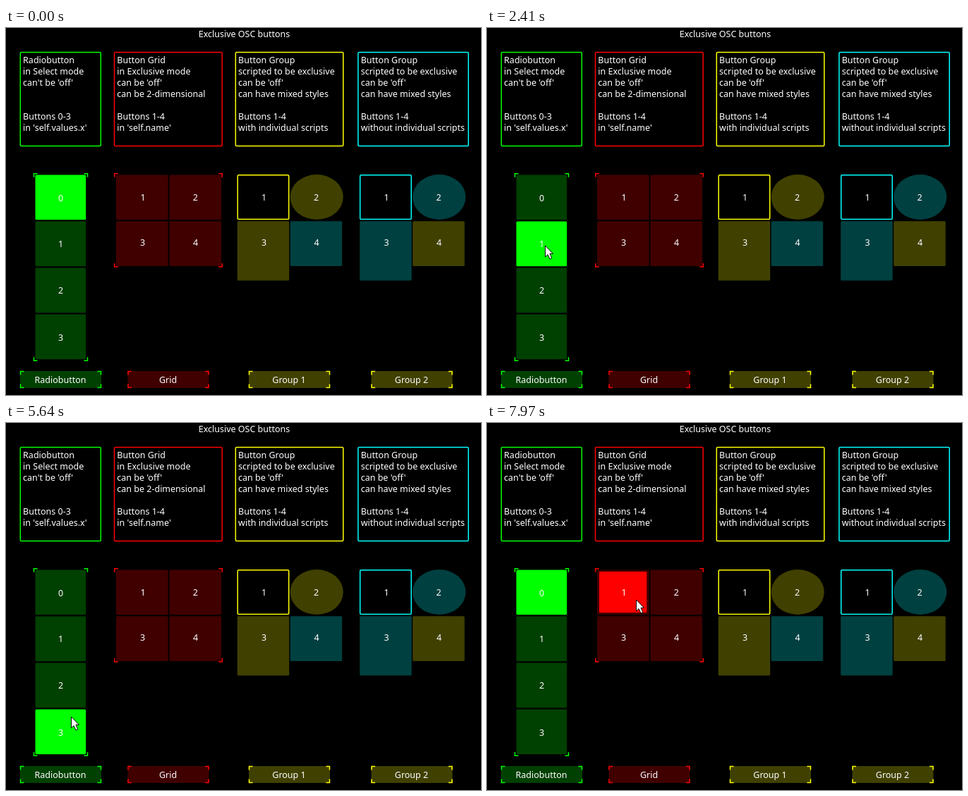
Recreate the animation shown at these times as an HTML page. Size 673 by 521 pixels, loop 8 s.

```html
<!DOCTYPE html>
<html lang="en">
<head>
<meta charset="utf-8">
<title>Exclusive OSC buttons</title>
<style>
html, body { margin: 0; width: 100%; height: 100%; overflow: hidden; background: #000; }
svg { display: block; }
text { font: 12.5px "Noto Sans", "Open Sans", sans-serif; fill: #fff; white-space: pre; }
.mid { text-anchor: middle; }
.line { fill: none; stroke-width: 1.5; }
</style>
</head>
<body>
<svg id="stage" width="673" height="521" viewBox="0 0 673 521"></svg>
<script>
const LOOP = 8000;
const stage = document.getElementById('stage');
const GREEN = '#00ff00', RED = '#ff0000', YELLOW = '#ffff00', CYAN = '#00ffff';
const DARK = { [GREEN]: '#004000', [RED]: '#400000', [YELLOW]: '#404000', [CYAN]: '#004040' };

function add(tag, attrs, content) {
  const node = document.createElementNS('http://www.w3.org/2000/svg', tag);
  for (const key in attrs) node.setAttribute(key, attrs[key]);
  if (content) node.textContent = content;
  return stage.appendChild(node);
}
const label = (x, y, content) => add('text', { x, y: y + 4.5, class: 'mid' }, content);
const block = (x, y, width, height, fill) => add('rect', { x, y, width, height, rx: 1.5, fill });
const outline = (x, y, width, height, stroke) =>
  add('rect', { x, y, width, height, rx: 1.5, stroke, class: 'line' });

function brackets(x, y, w, h, stroke) {
  const r = x + w, b = y + h;
  add('path', { class: 'line', stroke, d:
    `M${x} ${y + 5}V${y}H${x + 5}M${r - 5} ${y}H${r}V${y + 5}` +
    `M${r} ${b - 5}V${b}H${r - 5}M${x + 5} ${b}H${x}V${b - 5}` });
}

function infoBox(x, width, color, lines) {
  outline(x, 34.5, width, 133, color);
  lines.forEach((s, i) => s && add('text', { x: x + 3.8, y: 50 + i * 16 }, s));
}

function footer(x, color, name) {
  block(x, 487, 115, 24, DARK[color]);
  brackets(x + .5, 487.5, 114, 23, color);
  label(x + 57, 499.5, name);
}

function group(x, main, other) {
  outline(x + .5, 208.7, 72.5, 62.8, main);
  add('ellipse', { cx: x + 112.5, cy: 240, rx: 37.6, ry: 32, fill: DARK[main] });
  block(x, 274.3, 73.5, 84.2, DARK[main]);
  block(x + 75, 274.3, 73.5, 63.8, DARK[other]);
  label(x + 38, 240, '1');
  label(x + 112, 240, '2');
  label(x + 38, 304, '3');
  label(x + 112.3, 304, '4');
}

label(337.5, 8.5, 'Exclusive OSC buttons');

const scripted = ['Button Group', 'scripted to be exclusive', "can be 'off'",
  'can have mixed styles', '', 'Buttons 1-4'];
infoBox(20.3, 114, GREEN, ['Radiobutton', 'in Select mode', "can't be 'off'", '', '',
  'Buttons 0-3', "in 'self.values.x'"]);
infoBox(153.5, 152.7, RED, ['Button Grid', 'in Exclusive mode', "can be 'off'",
  'can be 2-dimensional', '', 'Buttons 1-4', "in 'self.name'"]);
infoBox(325.3, 152.5, YELLOW, [...scripted, 'with individual scripts']);
infoBox(498.9, 156.3, CYAN, [...scripted, 'without individual scripts']);

brackets(39.5, 206.7, 76, 265.5, GREEN);
const radio = [0, 1, 2, 3].map(i => {
  const cell = block(41.5, 208.4 + i * 66, 71.7, 63.8, DARK[GREEN]);
  label(77.7, [241, 306, 372, 439][i], String(i));
  return cell;
});

brackets(153.8, 206.7, 152.5, 132.3, RED);
for (const [x, y] of [[156, 208.4], [231.4, 208.4], [156, 274.3], [231.4, 274.3]])
  block(x, y, 73.6, 63.8, DARK[RED]);
const gridLit = block(159, 211, 67.3, 58.2, RED);
label(194, 240, '1');
label(268.3, 240, '2');
label(193.7, 304, '3');
label(268.5, 304, '4');

group(327.7, YELLOW, CYAN);
group(501.2, CYAN, YELLOW);

footer(20, GREEN, 'Radiobutton');
footer(172.5, RED, 'Grid');
footer(344, YELLOW, 'Group 1');
footer(517.5, YELLOW, 'Group 2');

const press = add('circle', { r: 12, fill: YELLOW, 'fill-opacity': .5 });
const pointer = add('path', { d: 'M.5 1V17L4 13.6L7 20L9.8 18.8L7 12.4H11.5Z',
  fill: '#fff', stroke: '#000' });

const ENTER = 980;
const moves = [
  [1084, 1290, 3, 137, 352],
  [1590, 1910, 4, 82, 308],
  [3120, 3420, 4, 77, 372],
  [4330, 4840, 6, 92, 426],
  [5640, 6250, 7, 101, 252],
  [6860, 7260, 5, 210, 250],
  [7970, 7970, 1, 211, 250]
];
const presses = [[2310, 2410], [3730, 3930], [5140, 5240], [6350, 6450], [7560, 7660]];
const selections = [[0, 0], [2410, 1], [3830, 2], [5240, 3], [6450, 0]];
const ease = p => p * p * (3 - 2 * p);

function pointerAt(t) {
  let x = 307, y = 492;
  for (const [start, end, steps, toX, toY] of moves) {
    if (t < start) break;
    const gap = (end - start) / Math.max(1, steps - 1) || 1;
    const step = Math.min(steps, Math.floor((t - start) / gap + .02) + 1);
    const p = ease(step / steps);
    x += (toX - x) * p;
    y += (toY - y) * p;
  }
  return [Math.round(x), Math.round(y)];
}

const show = (node, on) => node.setAttribute('visibility', on ? 'visible' : 'hidden');

function draw() {
  const t = performance.now() % LOOP;
  const [x, y] = pointerAt(t);
  const selected = selections.filter(s => s[0] <= t).pop()[1];
  radio.forEach((cell, i) => cell.setAttribute('fill', i === selected ? GREEN : DARK[GREEN]));
  show(gridLit, t >= 7660);
  show(pointer, t >= ENTER);
  show(press, presses.some(([from, to]) => t >= from && t < to));
  pointer.setAttribute('transform', `translate(${x} ${y})`);
  press.setAttribute('cx', x);
  press.setAttribute('cy', y + .5);
  requestAnimationFrame(draw);
}
draw();
</script>
</body>
</html>
```
